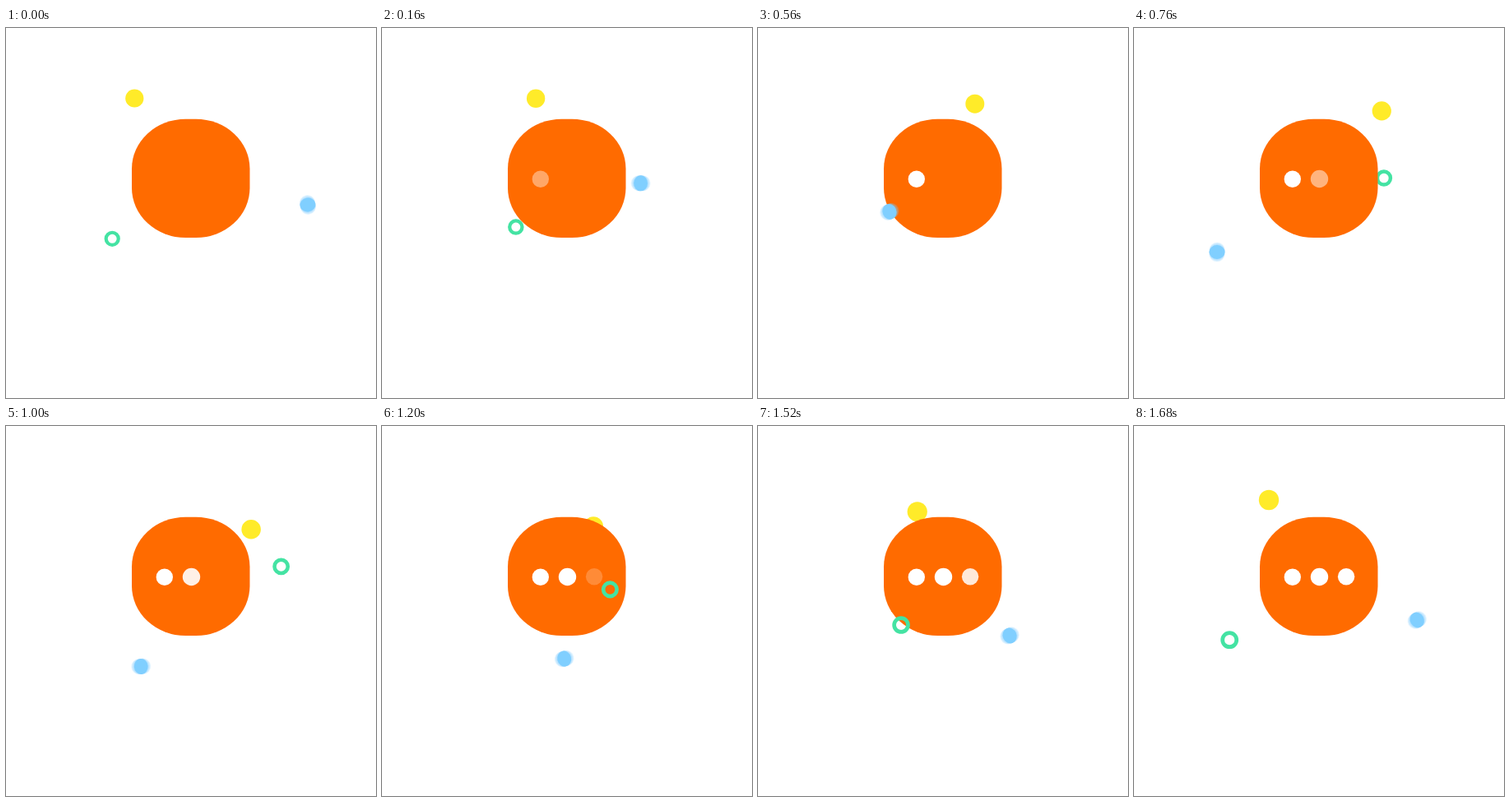
Animation, 450 px wide and 450 px high, one loop 1720 ms. Source, as an HTML page:

```html
<!DOCTYPE html>
<html lang="en">
<head>
<meta charset="utf-8">
<title>Typing bubble</title>
<style>
  html, body { margin: 0; width: 100%; height: 100%; overflow: hidden; background: #fff; }
  svg { display: block; width: 100%; height: 100%; }
</style>
</head>
<body>
<svg viewBox="0 0 450 450">
  <circle id="yellow" fill="#ffeb29"/>
  <g id="back"></g>
  <rect x="153" y="110.7" width="143.5" height="144.3" rx="65.5" ry="60.5" fill="#ff6b00"/>
  <g fill="#fff">
    <circle class="dot" cx="192.8" cy="183.7" r="10.2"/>
    <circle class="dot" cx="225.5" cy="183.5" r="10.7"/>
    <circle class="dot" cx="258.1" cy="183.2" r="10.2"/>
  </g>
  <g id="front"><circle id="ring" fill="none" stroke="#44e3a3"/></g>
  <g id="blue" fill="#80cfff"></g>
</svg>
<script>
const LOOP = 1720, STEP = 40, END = LOOP - STEP;
const $ = id => document.getElementById(id);
const make = tag => document.createElementNS("http://www.w3.org/2000/svg", tag);
const set = (el, attrs) => { for (const k in attrs) el.setAttribute(k, attrs[k]); };

// A leg runs along a curve; pull > 0 starts fast, pull < 0 starts slowly
function leg(from, to, pull, d) {
  const path = make("path");
  set(path, { d });
  const length = path.getTotalLength();
  return t => {
    const u = (t - from) / (to - from);
    return path.getPointAtLength(length * (u + pull * u * (1 - u)));
  };
}

// An orbit swings out to its turning time, then back
function orbit(turn, [outPull, out], [homePull, home]) {
  const there = leg(0, turn, outPull, out), back = leg(turn, END, homePull, home);
  return t => t < turn ? there(t) : back(t);
}

const RING_TURN = 940;
const yellowAt = orbit(880,
  [0, "M156.3 85.5C210 84.5 318 92 318 115"],
  [0, "M318 115C318 140 210 118 164 90"]);
const ringAt = orbit(RING_TURN,
  [-0.13, "M129.2 256.3C205 224 338 169 350.5 162"],
  [-0.13, "M350.5 162C343 168 205 238 116.2 260.2"]);
const blueAt = orbit(760,
  [0, "M367 215C360 150 101 220 101 272.5"],
  [0.08, "M101 272.5C101 312 245 292 344.3 236"]);

// Blue ball: a solid core in a haze smeared along its direction of travel
const R = 9.5, SMEAR = 2.6, COPIES = 9;
for (let i = 0; i < COPIES; i++) {
  const haze = make("ellipse");
  set(haze, { cx: (i / (COPIES - 1) * 2 - 1) * SMEAR, rx: R, ry: R, opacity: 0.14 });
  $("blue").append(haze);
}
const core = make("ellipse");
set(core, { rx: R - 1.1, ry: R });
$("blue").append(core);

const dots = document.querySelectorAll(".dot");

function draw(t) {
  const grow = t / END;

  const y = yellowAt(t);
  set($("yellow"), { cx: y.x, cy: y.y, r: 11.1 + 1.1 * grow });

  const g = ringAt(t), size = 1 + 0.13 * grow;
  set($("ring"), { cx: g.x, cy: g.y, r: 7.55 * size, "stroke-width": 4.2 * size });
  $(t < RING_TURN ? "back" : "front").append($("ring"));

  const b = blueAt(t), p = blueAt(Math.max(t - 10, 0)), q = blueAt(Math.min(t + 10, END));
  const angle = Math.atan2(q.y - p.y, q.x - p.x) * 180 / Math.PI;
  set($("blue"), { transform: `translate(${b.x} ${b.y}) rotate(${angle})` });

  dots.forEach((dot, i) => {
    const u = Math.min(Math.max((t - 560 * i) / 573, 0), 1);
    set(dot, { opacity: 1 - (1 - u) ** 1.6 });
  });
}

const start = performance.now();
function tick() {
  const t = (performance.now() - start) % LOOP;
  draw(Math.floor(t / STEP) * STEP);
  requestAnimationFrame(tick);
}
tick();
</script>
</body>
</html>
```
